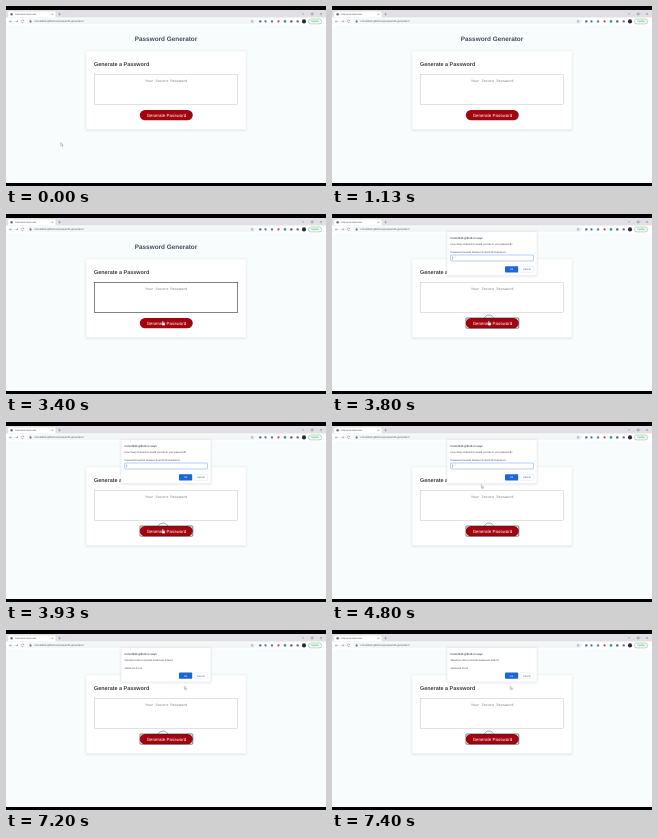
Write an HTML page that moves like this. It is 320 px wide and 180 px high and loops after 8000 ms.

```html
<!DOCTYPE html>
<html lang="en">
<head>
<meta charset="utf-8">
<title>Password Generator</title>
<style>
  html, body { margin: 0; width: 100%; height: 100%; overflow: hidden; background: #000; }
  svg { display: block; width: 100vw; height: 100vh; }
  text { font-family: "Liberation Sans", Arial, sans-serif; text-rendering: geometricPrecision; }
  .mono { font-family: "Liberation Mono", "Courier New", monospace; }
  .bold { font-weight: bold; }
  .mid { text-anchor: middle; }
  .line { fill: none; stroke: #5f6368; stroke-width: .4; }
  .small { font-size: 2.52px; fill: #3c4043; }
</style>
</head>
<body>
<svg viewBox="0 0 320 180">
  <defs>
    <filter id="soft" x="-10%" y="-10%" width="120%" height="130%">
      <feDropShadow dx="0" dy=".4" stdDeviation=".8" flood-color="#000" flood-opacity=".14"/>
    </filter>
  </defs>

  <rect width="320" height="180"/>
  <rect y="4" width="320" height="173" fill="#fff"/>
  <rect y="4" width="320" height="7.500" fill="#e1dfe5"/>
  <path d="M1 11.500q1 0 1-1V6.600q0-1.200 1.200-1.200H48.300q1.200 0 1.200 1.200V10.500q0 1 1 1z" fill="#fff"/>
  <circle cx="5.600" cy="8.300" r="1.200" fill="#6b7075"/>
  <text x="9.300" y="9.100" font-size="2.300" fill="#45494d">Password Generator</text>
  <path class="line" d="M45.600 7.500l1.500 1.500m0-1.500l-1.500 1.500M53.600 7.100v2.200m-1.100-1.100h2.200M296 8h2M305.300 7h1.800v1.800h-1.800zM314 7l1.800 1.800m0-1.800l-1.800 1.800"/>

  <rect x="21" y="12.500" width="229" height="5.800" rx="2.900" fill="#f4f5f6"/>
  <path class="line" d="M6 15.400H3.400m1.100-1.100l-1.100 1.100 1.100 1.100M9.400 15.400H12m-1.100-1.100l1.100 1.100-1.100 1.100M17.700 14.600a1.300 1.300 0 1 0 .1 1.300m0-2v.9h-.9"/>
  <rect x="23.700" y="15" width="1.700" height="1.400" fill="#5f6368"/>
  <path class="line" d="M24 15v-.5a.55.55 0 0 1 1.100 0v.5"/>
  <text x="28.500" y="16.400" font-size="2.750" fill="#5a5e62">norvelk42.github.io/password-generator/</text>
  <circle class="line" cx="246.200" cy="15.400" r="1"/>
  <g id="badges"></g>
  <rect x="302.300" y="13" width="13.400" height="4.900" rx="2.450" fill="#f2faf4" stroke="#4b9b62" stroke-width=".35"/>
  <text class="mid" x="309" y="16.250" font-size="2.300" fill="#2d8a4a">Update</text>

  <rect y="19.500" width="320" height="157.500" fill="#f9fcfd"/>
  <text class="mid bold" x="160" y="35" font-size="6.400" fill="#3f4e58">Password Generator</text>
  <rect x="80" y="45" width="160" height="78.500" rx=".8" fill="#fff" stroke="#e4e7e9" stroke-width=".4" filter="url(#soft)"/>
  <text class="bold" x="88" y="60.200" font-size="5.450" fill="#3c3c3c">Generate a Password</text>
  <rect id="area" x="88.400" y="68.600" width="143.300" height="30" fill="#fff"/>
  <text class="mid mono" x="160.200" y="75.600" font-size="3.550" fill="#777">Your Secure Password</text>
  <circle id="ring" cx="157" cy="106.500" r="5.500" fill="none" stroke="#555" stroke-width=".5"/>
  <rect x="133.800" y="103.900" width="53" height="10.400" rx="5.200" fill="#a1040f"/>
  <rect id="focus" x="134" y="104" width="52.800" height="10.200" rx=".8" fill="none" stroke="#222" stroke-width=".6"/>
  <text class="mid" x="160.400" y="110.700" font-size="4.480" fill="#fff">Generate Password</text>

  <g id="dialog">
    <rect id="panel" x="115" y="17.500" width="90" rx=".8" fill="#fff" stroke="#cfd2d5" stroke-width=".3" filter="url(#soft)"/>
    <text x="118.500" y="24.800" font-size="3" fill="#202124">norvelk42.github.io says</text>
    <text id="ask" class="small" x="118.500" y="30.600"></text>
    <text id="hint" class="small" x="118.500" y="38.600"></text>
    <g id="field">
      <rect x="118.700" y="41" width="82.800" height="6" rx=".6" fill="#fff" stroke="#6d9be6" stroke-width=".5"/>
      <path id="caret" d="M120.600 42.600v2.900" stroke="#333" stroke-width=".35"/>
      <text id="typed" class="small" x="120.400" y="44.950"></text>
    </g>
    <g id="choices">
      <rect x="173" y="0" width="13.200" height="6.300" rx=".8" fill="#1a66d2"/>
      <text class="mid" x="179.600" y="4.050" font-size="2.500" fill="#fff">OK</text>
      <rect x="188" y="0" width="13.500" height="6.300" rx=".8" fill="#fff" stroke="#dadce0" stroke-width=".3"/>
      <text class="mid" x="194.800" y="4.050" font-size="2.500" fill="#1a66d2">Cancel</text>
    </g>
  </g>

  <g id="pointer" stroke="#555" stroke-width=".3" fill="#fff" stroke-linejoin="round">
    <path id="arrow" d="M0 0V3.300L.8 2.600 1.400 3.900 2 3.600 1.400 2.400H2.400z"/>
    <path id="hand" d="M-.5 .3q.5-.7 1 0V1.700L2.300 2.100V3.500L1.700 4.500H-.4L-1.500 2.600q0-.7 1 0z"/>
  </g>
</svg>
<script>
const LOOP = 8000;
const AREA_FOCUS = 1800, PRESS = 3600, PROMPT = 3730, CONFIRM = 7000;
const $ = id => document.getElementById(id);
const show = (id, on) => $(id).setAttribute("visibility", on ? "inherit" : "hidden");
const set = (id, attrs) => {
  for (const k in attrs) $(id).setAttribute(k, attrs[k]);
};

// Toolbar extensions: centre, radius, colour
$("badges").innerHTML = [
  [254.3, 1.2, "#3f6fc0"], [259.5, 1.1, "#56688a"], [266, 1.2, "#4a7fd0"],
  [272.5, 1.1, "#c8443c"], [279, 1.4, "#2fae6a"], [285.3, 1.2, "#55595e"],
  [291.7, 1.2, "#6b7075"], [298, 2.1, "#2b2b35"]
].map(([x, r, c]) => `<circle cx="${x}" cy="15.4" r="${r}" fill="${c}"/>`).join("");

// Pointer moves: start, end, from, to
const moves = [
  [560, 730, [54.7, 136.5], [110, 98]],
  [3000, 3300, [154, 101], [156.8, 107]],
  [4400, 4800, [156.8, 107], [149.3, 62.8]],
  [5060, 5330, [149.3, 62.8], [146.3, 57.5]],
  [6430, 6830, [146.3, 57.5], [178.3, 56]]
];

function pointerAt(t) {
  const [a, b, from, to] = moves.filter(m => m[0] <= t).pop() || moves[0];
  const u = Math.min(1, Math.max(0, (t - a) / (b - a)));
  const e = u * u * (3 - 2 * u);
  return from.map((v, i) => v + (to[i] - v) * e);
}

function draw(t) {
  const areaFocus = t >= AREA_FOCUS && t < PRESS;
  set("area", {
    stroke: areaFocus ? "#333" : "#aaa",
    "stroke-width": areaFocus ? .6 : .35
  });
  show("ring", t >= PRESS);
  show("focus", t >= PRESS);

  const confirm = t >= CONFIRM;
  show("dialog", t >= PROMPT);
  show("field", t >= PROMPT && !confirm);
  set("panel", { height: confirm ? 34.5 : 44 });
  set("choices", { transform: `translate(0 ${confirm ? 42.5 : 52.2})` });
  $("ask").textContent = confirm
    ? "Would you like to include lowercase letters?"
    : "How many characters would you like in your password?";
  $("hint").textContent = confirm
    ? "ok/cancel for no"
    : "Password must be between 8 and 128 characters";
  $("typed").textContent = "10".slice(0, t < 5730 ? 0 : t < 5930 ? 1 : 2);
  show("caret", t >= PROMPT && t < 5730);

  const [x, y] = pointerAt(t);
  const hand = t >= 3000 && t < 4460;
  set("pointer", { transform: `translate(${x} ${y})` });
  show("pointer", t < 730 || t >= 3060);
  $("arrow").style.display = hand ? "none" : "";
  $("hand").style.display = hand ? "" : "none";
}

const begin = performance.now();
function tick() {
  draw((performance.now() - begin) % LOOP);
  requestAnimationFrame(tick);
}
tick();
</script>
</body>
</html>
```
